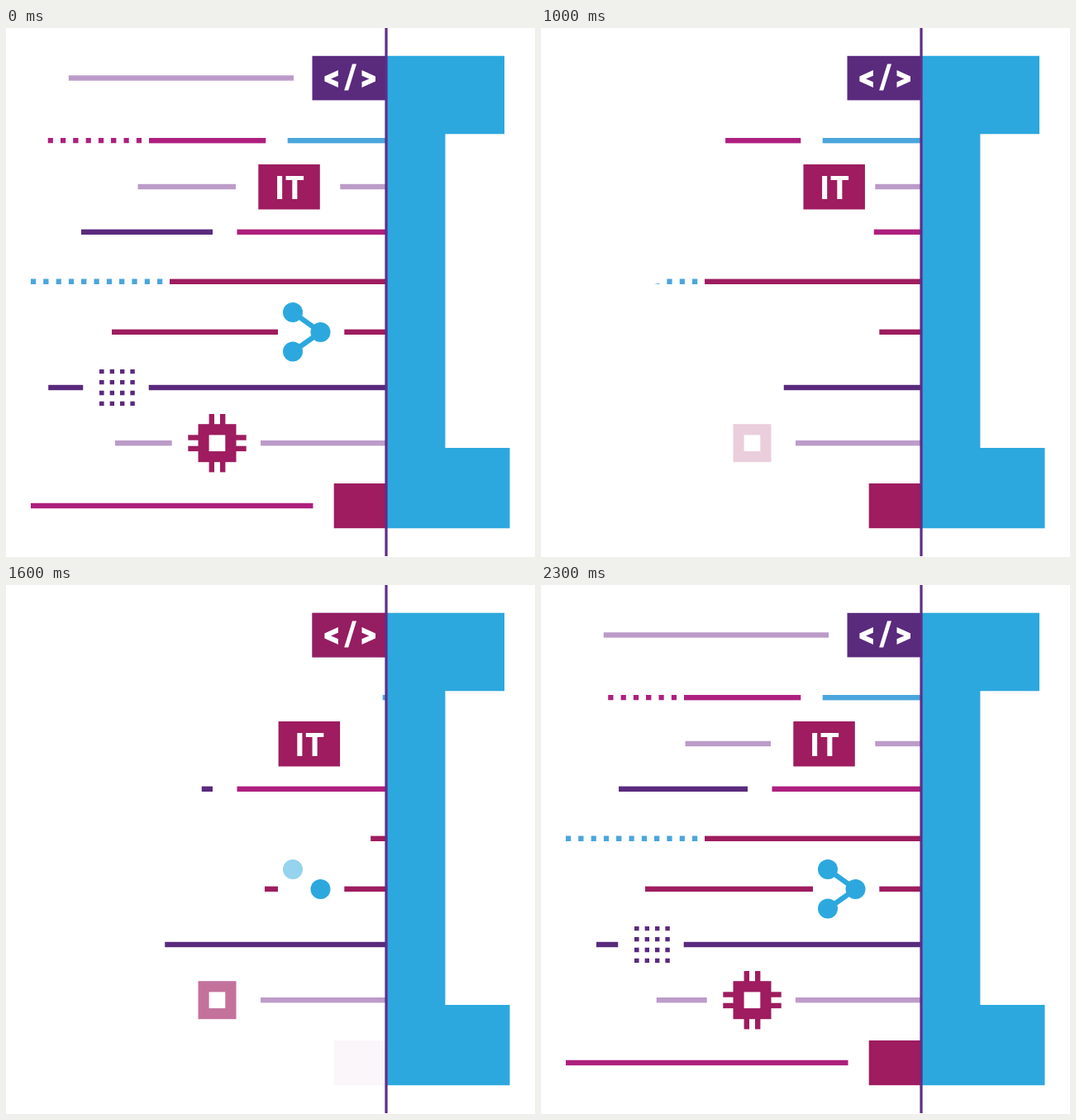
Write an HTML page with a canvas that moves like this. It is 640 px wide and 640 px high and loops after 2400 ms.

```html
<!DOCTYPE html>
<html lang="en">
<head>
<meta charset="utf-8">
<title>IT bracket</title>
<style>
html, body { margin: 0; width: 100%; height: 100%; overflow: hidden; background: #fff; }
canvas { display: block; }
</style>
</head>
<body>
<canvas width="640" height="640"></canvas>
<script>
const ctx = document.querySelector('canvas').getContext('2d');
const BLUE = '#2ca8df', SKY = '#4aa6dc', LILAC = '#bc9bc9', MAGENTA = '#ae1f7e',
  PURPLE = '#5a2a7d', CRIMSON = '#9e1c5f', WHITE = '#fff';
const LOOP = 2400, STEP = 100, AXIS = 460, THICK = 6.4;
let now = 0;

const ramp = (from, to) => Math.min(1, Math.max(0, (now - from) / (to - from)));

// Share of a part that shows: it leaves during out..gone and returns during back..full
const life = (out, gone, back, full) => 1 - ramp(out, gone) + ramp(back, full);

function rect(color, x, y, w, h, alpha = 1) {
  ctx.globalAlpha = alpha;
  ctx.fillStyle = color;
  ctx.fillRect(x, y, w, h);
  ctx.globalAlpha = 1;
}

// Line that shrinks towards its right end
function bar(color, y, left, right, ...times) {
  const w = (right - left) * life(...times);
  rect(color, right - w, y - THICK / 2, w, THICK);
}

function poly(color, ...p) {
  ctx.fillStyle = color;
  ctx.beginPath();
  for (let i = 0; i < p.length; i += 2) ctx.lineTo(p[i], p[i + 1]);
  ctx.fill();
}

// Square wiped by a ray that turns about its lower left corner
function dot(color, x, y, size, shown) {
  if (shown <= 0) return;
  ctx.save();
  ctx.beginPath();
  ctx.rect(x, y, size, size);
  ctx.clip();
  ctx.fillStyle = color;
  ctx.beginPath();
  ctx.moveTo(x, y + size);
  ctx.arc(x, y + size, size * 2, -Math.min(1, shown) * Math.PI / 2, 0);
  ctx.fill();
  ctx.restore();
}

// Dots vanish one by one, column after column
function dots(color, x, y, cols, rows, pitchX, pitchY, size, ...times) {
  const total = cols * rows, count = total * life(...times);
  for (let i = 0; i < total; i++) {
    const col = Math.floor(i / rows), row = i % rows;
    dot(color, x + col * pitchX, y + row * pitchY, size, count - (total - 1 - i));
  }
}

const dotRow = (color, x, y, n, ...times) =>
  dots(color, x, y - THICK / 2, n, 1, 15.3, 0, THICK, ...times);

function codeBox() {
  rect(PURPLE, 370.5, 33.8, 90, 53.6);
  rect(CRIMSON, 370.5, 33.8, 90, 53.6, 1 - life(1048, 1683, 1800, 1917));
  for (const s of [1, -1]) {
    const x = d => 416.2 + s * d, y = 61.5;
    poly(WHITE, x(-14.3), y - 10.4, x(-14.3), y - 3.7, x(-23.2), y, x(-14.3), y + 3.7,
      x(-14.3), y + 10.4, x(-30.8), y + 3, x(-30.8), y - 3);
  }
  poly(WHITE, 409.2, 75.6, 414.2, 75.6, 424, 43.6, 419, 43.6);
}

function itBox() {
  const x = 329.6 - 24.3 * life(880, 1120, 1830, 2025);
  rect(CRIMSON, x, 165, 74.5, 54.5);
  ctx.fillStyle = WHITE;
  ctx.font = 'bold 40px "Open Sans", sans-serif';
  ctx.textAlign = 'center';
  ctx.fillText('IT', x + 37.3, 207);
}

function disc(x, y, ...times) {
  ctx.globalAlpha = life(...times);
  ctx.fillStyle = BLUE;
  ctx.beginPath();
  ctx.arc(x, y, 12, 0, 7);
  ctx.fill();
  ctx.globalAlpha = 1;
}

function link(dy, ...times) {
  const f = life(...times);
  ctx.strokeStyle = BLUE;
  ctx.lineWidth = THICK;
  ctx.beginPath();
  ctx.moveTo(380.5, 368);
  ctx.lineTo(380.5 - 33.5 * f, 368 + dy * f);
  if (f > 0) ctx.stroke();
}

function share() {
  link(-24, 540, 680, 1650, 1760);
  link(23.6, 435, 535, 1780, 1967);
  disc(347, 344, 730, 826, 1550, 1650);
  disc(347, 391.6, 300, 430, 1780, 1916);
  disc(380.5, 368, 850, 1000, 1400, 1500);
}

function chip() {
  const cx = 255.5, cy = 502.2, pin = life(510, 770, 1700, 1994), half = 23 + 12.2 * pin;
  if (pin > 0) {
    for (const d of [-6.7, 6.7]) {
      rect(CRIMSON, cx - half, cy + d - 3.2, 2 * half, THICK);
      rect(CRIMSON, cx + d - 3.2, cy - half, THICK, 2 * half);
    }
  }
  rect(CRIMSON, cx - 23, cy - 23, 46, 46, life(820, 1050, 1440, 1698));
  rect(WHITE, cx - 9.9, cy - 9.8, 19.7, 19.7);
}

function draw() {
  rect(WHITE, 0, 0, 640, 640);

  bar(LILAC, 60.5, 75.8, 348, 384, 907, 1950, 2290);
  codeBox();

  dotRow(MAGENTA, 50.5, 136.2, 8, 418, 855, 2100, 2367);
  bar(MAGENTA, 136.2, 173, 314.3, 855, 1264, 1965, 2110);
  bar(SKY, 136.2, 340.7, AXIS, 1330, 1610, 1620, 1952);

  bar(LILAC, 192, 156.6, 278, -21, 836, 2000, 2352);
  itBox();
  bar(LILAC, 192, 404.3, AXIS, 1175, 1400, 1650, 1830);

  bar(PURPLE, 246.8, 91, 250, 0, 420, 1535, 2315);
  bar(MAGENTA, 246.8, 279.5, AXIS, 500, 810, 850, 1323);

  dotRow(SKY, 29.8, 306.8, 11, 267, 1290, 1680, 2120);
  bar(CRIMSON, 306.8, 198, AXIS, 1290, 1624, 1650, 1947);

  bar(CRIMSON, 367.8, 126, 329, -4, 400, 1540, 2300);
  share();
  bar(CRIMSON, 367.8, 409.3, AXIS, 1000, 1265, 1265, 1400);

  bar(PURPLE, 435, 51.2, 93.2, 0, 220, 2140, 2396);
  dots(PURPLE, 113, 413, 4, 4, 12.4, 12.9, 5.6, 200, 556, 1750, 2215);
  bar(PURPLE, 435, 172.7, AXIS, 850, 1206, 1230, 1627);

  bar(LILAC, 502.2, 132, 200.7, 0, 510, 1950, 2344);
  chip();
  bar(LILAC, 502.2, 308, AXIS, 1050, 1246, 1290, 1500);

  bar(MAGENTA, 578, 30, 371.5, 257, 948, 1856, 2280);
  rect(CRIMSON, 396.7, 551, 63, 54.2, life(1098, 1621, 1700, 2240));

  poly(BLUE, AXIS, 33.8, 603, 33.8, 603, 128.2, 531.4, 128.2,
    531.4, 508, 609.5, 508, 609.5, 605.2, AXIS, 605.2);
  rect('#5f2d88', 458.4, 0, 3.2, 639);
}

function frame() {
  now = Math.floor(performance.now() % LOOP / STEP) * STEP;
  draw();
  requestAnimationFrame(frame);
}
frame();
</script>
</body>
</html>
```
